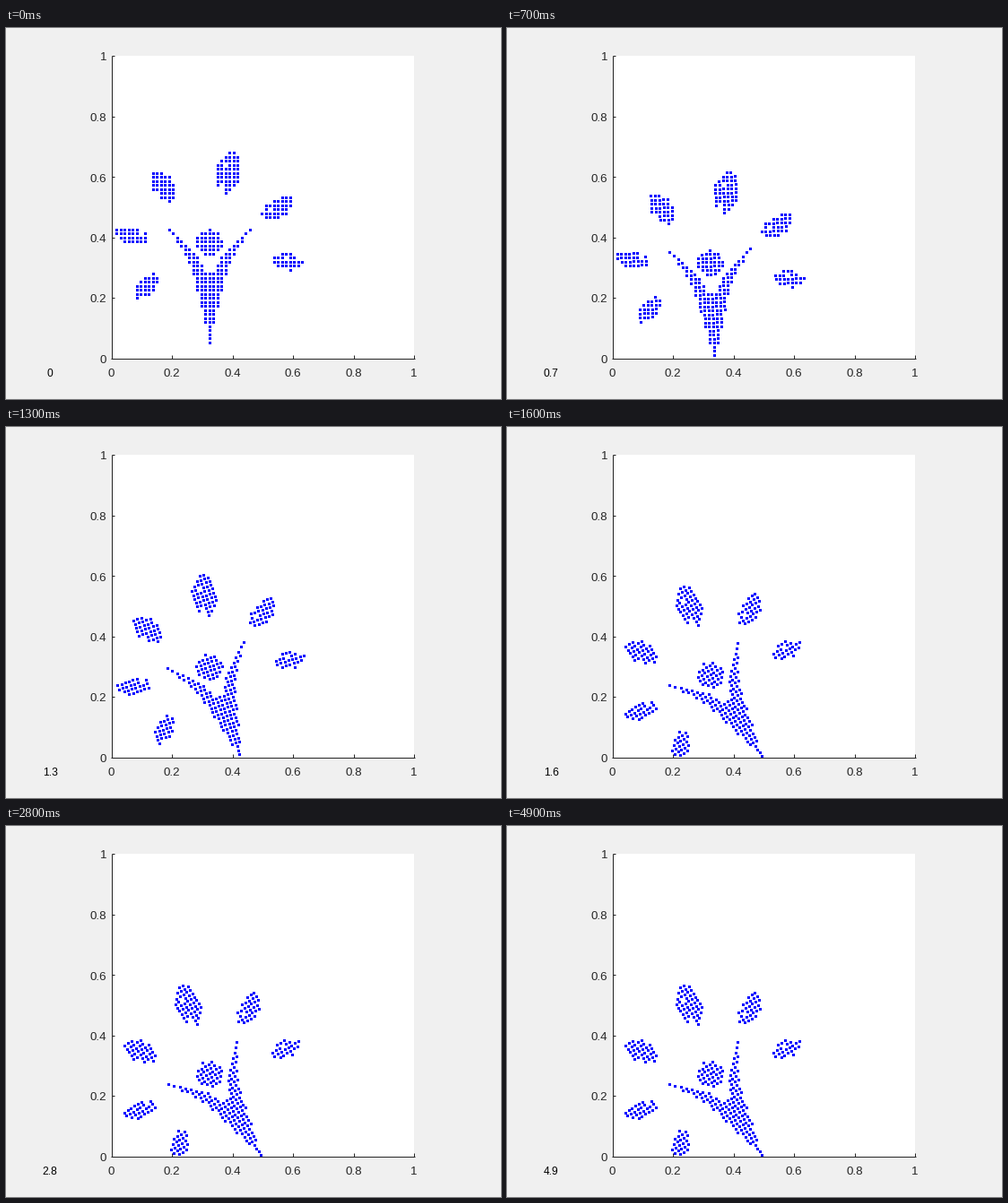
These frames come from a looping animation (552 by 414 pixels, 5000 ms). A matplotlib script:

```python
import numpy as np
import matplotlib.pyplot as plt
from matplotlib.animation import FuncAnimation

W, H, DPI = 552, 414, 96
PX = 72 / DPI
LEFT, RIGHT, TOP, BOTTOM = 117, 454.5, 30.5, 368
SPACING = 4.5
INK = "#262626"

# Each blob: first grid row, then the (first, last) column of every row.
BLOBS = [
    (0, [(-23, -18), (-23, -16), (-22, -16), (-21, -16)]),
    (-14, [(-14, -12), (-14, -10), (-14, -10), (-14, -9),
           (-14, -9), (-12, -9), (-12, -9), (-10, -10)]),
    (-19, [(5, 6), (4, 7), (3, 7), (2, 7), (2, 7), (2, 7),
           (2, 7), (2, 7), (2, 6), (4, 5), (4, 4)]),
    (-8, [(18, 20), (16, 20), (14, 20), (14, 19), (13, 19), (14, 17)]),
    (6, [(18, 20), (16, 21), (16, 23), (17, 22), (20, 20)]),
    (11, [(-14, -14), (-16, -13), (-17, -13), (-18, -14),
          (-18, -14), (-18, -15), (-18, -18)]),
    (0, [(0, 0), (-2, 2), (-3, 2), (-3, 3), (-3, 3), (-2, 2), (-1, 1)]),
]
HOLES = {(-17, 1), (4, -16), (3, -11), (15, -5), (19, 7)}

# Half widths of the forked stem, row by row.
STEM_OUTER = [10, 9, 8, 8, 7, 6, 6, 5, 5, 4, 4, 4] + [3] * 4 + [2] * 4 + [1] * 4 + [0] * 5
STEM_INNER = [10, 9, 8, 7, 6, 5, 4, 3, 3, 2, 2] + [0] * 18


def build_body():
    cells = set()
    for row, spans in BLOBS:
        for j, (a, b) in enumerate(spans, row):
            cells |= {(k, j) for k in range(a, b + 1)}
    for j, (outer, inner) in enumerate(zip(STEM_OUTER, STEM_INNER)):
        for k in range(inner, outer + 1):
            cells |= {(k, j), (-k, j)}
    return SPACING * np.array(sorted(cells - HOLES), float)


BODY = build_body()
FALL_TIME = 0.26
REST_ANGLE = 32.2


def pose(t):
    """Angle in radians and position of the body's reference point."""
    if t < FALL_TIME:
        return 0.0, 226.3, 224 + 23 * (t / FALL_TIME) ** 2
    deg = min(5.46 * (np.cosh(2.1 * (t - FALL_TIME)) - 1), REST_ANGLE)
    angle = np.radians(deg)
    lift = 2.4 * max(0, (deg - 19) / (REST_ANGLE - 19)) ** 2
    return angle, 226.3 - 14 * np.sin(angle), 373 - 126 * np.cos(angle) - lift


fig = plt.figure(figsize=(W / DPI, H / DPI), dpi=DPI, facecolor="#f0f0f0")
ax = fig.add_axes([0, 0, 1, 1])
ax.set_xlim(-0.5, W - 0.5)
ax.set_ylim(H - 0.5, -0.5)
ax.axis("off")


def label(x, y, text, size, color=INK, ha="center"):
    return ax.text(x, y, text, fontsize=size * PX, color=color, ha=ha,
                   va="center_baseline", family="Liberation Sans")


def line(xs, ys):
    ax.plot(xs, ys, color=INK, lw=PX, solid_capstyle="butt", zorder=2)


ax.add_patch(plt.Rectangle((LEFT, TOP), RIGHT - LEFT, BOTTOM - TOP, fc="white", lw=0))
line([LEFT, LEFT], [TOP, BOTTOM + 0.5])
line([LEFT - 0.5, RIGHT + 0.5], [BOTTOM, BOTTOM])
for v in np.arange(6) / 5:
    x = LEFT + v * (RIGHT - LEFT)
    y = BOTTOM - v * (BOTTOM - TOP)
    line([x, x], [BOTTOM, BOTTOM - 3.5])
    line([LEFT, LEFT + 3.5], [y, y])
    label(x, 384, f"{v:g}", 13.33)
    label(111.5, y + 1, f"{v:g}", 13.33, ha="right")

dots, = ax.plot([], [], "s", color="#0000ff", ms=3 * PX, mew=0, zorder=3)
clock = label(48.7, 384, "0", 12, "black")


def update(i):
    t = i / 10
    angle, cx, cy = pose(t)
    c, s = np.cos(angle), np.sin(angle)
    x = cx + BODY[:, 0] * c + BODY[:, 1] * s
    y = cy - BODY[:, 0] * s + BODY[:, 1] * c
    inside = y <= BOTTOM
    dots.set_data(x[inside], y[inside])
    clock.set_text(f"{t:g}")
    return dots, clock


anim = FuncAnimation(fig, update, frames=50, interval=100, repeat=True, repeat_delay=0)
plt.show()
```
